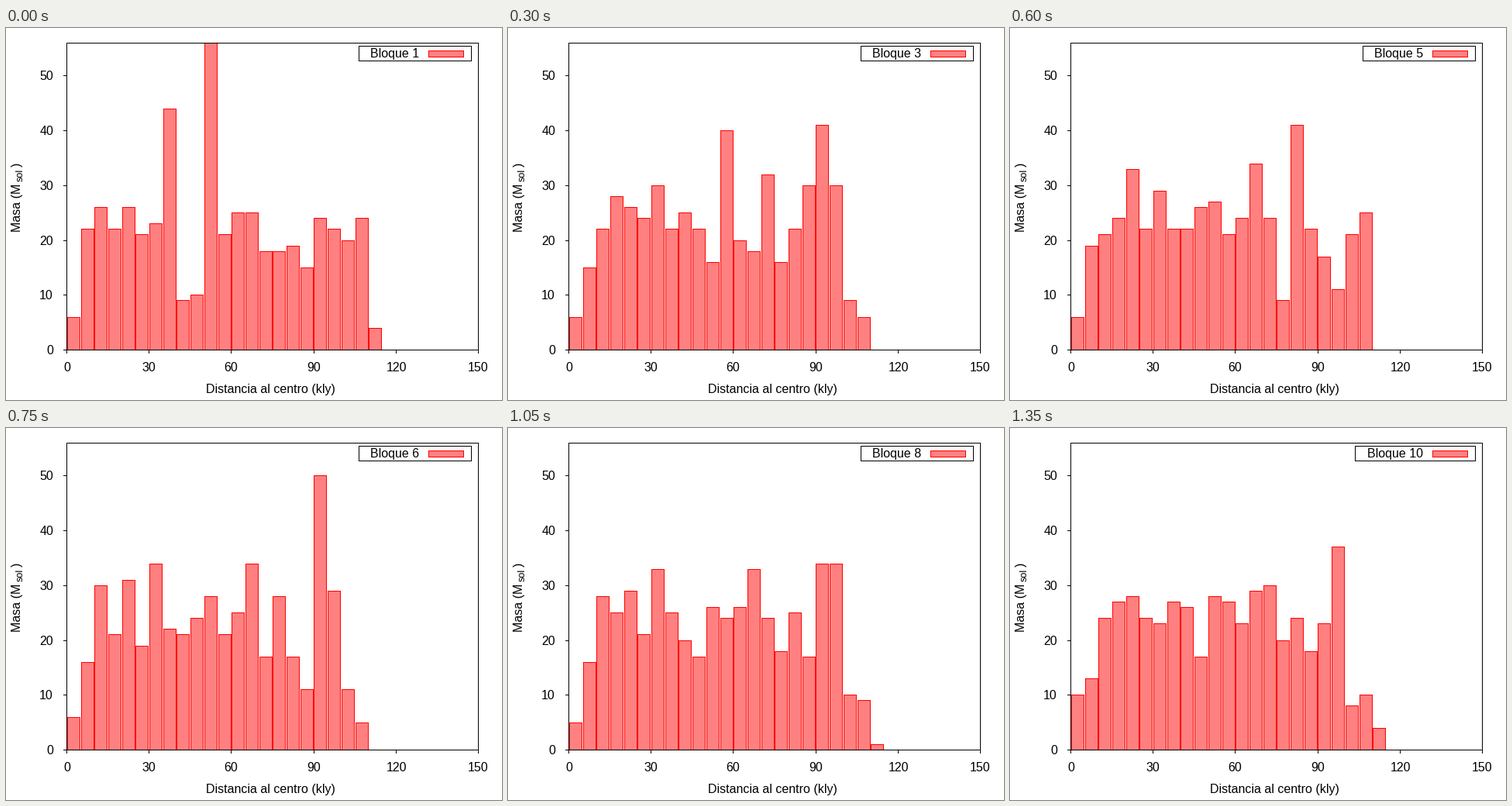
Animation, 640 px wide and 480 px high, one loop 1.5 s. Source, as a matplotlib script:

```python
import numpy as np
import matplotlib.pyplot as plt
from matplotlib.animation import FuncAnimation
from matplotlib.patches import Rectangle

W, H, DPI = 640, 480, 80
LEFT, RIGHT, TOP, BOTTOM = 78, 609, 19, 415
X_MAX, Y_MAX, BIN = 150, 56, 5
TOTAL = 500          # every block holds the same mass
BINS = 23
RED, PINK = "#ff0000", "#ff8080"


def block(*masses):
    """Bin masses; the last occupied bin takes what is left of the total."""
    out = np.zeros(BINS)
    out[:len(masses)] = masses
    out[len(masses)] = TOTAL - sum(masses)
    return out


def between(a, b, first):
    """A block halfway between two others, with a given innermost bin."""
    mid = np.rint((a + b) / 2)[:21]
    mid[0] = first
    return block(*mid)


b1 = block(6, 22, 26, 22, 26, 21, 23, 44, 9, 10, 56, 21, 25, 25, 18, 18,
           19, 15, 24, 22, 20, 24)
b2 = block(8, 17, 20, 31, 25, 25, 31, 20, 26, 21, 12, 48, 20, 17, 21, 18,
           31, 45, 26, 32)
b4 = block(8, 13, 25, 24, 28, 24, 30, 24, 24, 23, 21, 32, 21, 20, 44, 15,
           14, 15, 56, 27)
b5 = block(6, 19, 21, 24, 33, 22, 29, 22, 22, 26, 27, 21, 24, 34, 24, 9,
           41, 22, 17, 11, 21)
b6 = block(6, 16, 30, 21, 31, 19, 34, 22, 21, 24, 28, 21, 25, 34, 17, 28,
           17, 11, 50, 29, 11)
b8 = block(5, 16, 28, 25, 29, 21, 33, 25, 20, 17, 26, 24, 26, 33, 24, 18,
           25, 17, 34, 34, 10, 9)
b10 = block(10, 13, 24, 27, 28, 24, 23, 27, 26, 17, 28, 27, 23, 29, 30, 20,
            24, 18, 23, 37, 8, 10)
blocks = [b1, b2, between(b2, b4, 6), b4, b5, b6,
          between(b6, b8, 5), b8, between(b8, b10, 8), b10]

plt.rcParams["font.family"] = "Liberation Sans"
fig = plt.figure(figsize=(W / DPI, H / DPI), dpi=DPI, facecolor="white")
ax = fig.add_axes([0, 0, 1, 1])
ax.set_xlim(0, W)
ax.set_ylim(H, 0)
ax.axis("off")


def px(x):
    return LEFT + x * (RIGHT - LEFT) / X_MAX


def py(y):
    return int(round(BOTTOM - y * (BOTTOM - TOP) / Y_MAX))


def box(x0, y0, x1, y1, color, z=1):
    """Fill whole pixels from (x0, y0) to (x1, y1), both included."""
    return ax.add_patch(Rectangle((x0, y0), x1 - x0 + 1, y1 - y0 + 1, lw=0,
                                  fc=color, antialiased=False, zorder=z))


def outlined(x0, y0, x1, y1, edge, fill, z=1):
    return (box(x0, y0, x1, y1, edge, z),
            box(x0 + 1, y0 + 1, x1 - 1, y1 - 1, fill, z + 0.1))


def span(rect, x0, y0, x1, y1):
    rect.set_bounds(x0, y0, x1 - x0 + 1, y1 - y0 + 1)


def label(x, y, s, ha="center", size=16, rot=0):
    return ax.text(x, y, s, ha=ha, va="baseline", fontsize=size * 72 / DPI,
                   color="black", rotation=rot, rotation_mode="anchor",
                   zorder=6)


# Frame, ticks and labels
for edge in ((LEFT, TOP, RIGHT, TOP), (LEFT, BOTTOM, RIGHT, BOTTOM),
             (LEFT, TOP, LEFT, BOTTOM), (RIGHT, TOP, RIGHT, BOTTOM)):
    box(*edge, "black", 5)
for v in range(0, X_MAX + 1, 30):
    x = int(round(px(v)))
    box(x, BOTTOM, x, BOTTOM + 4, "black", 5)
    label(x + 0.5, 443, str(v))
for v in range(0, Y_MAX, 10):
    y = py(v)
    box(LEFT - 4, y, LEFT, y, "black", 5)
    label(61, y + 6, str(v), "right")
label(341, 471, "Distancia al centro (kly)")
label(19, 263, "Masa (M", "left", rot=90)
label(22, 198, "sol", "left", 12.8, 90)
label(19, 179, ")", "left", rot=90)

# Legend
key = outlined(455, 23, 600, 42, "black", "white", 3)
outlined(545, 29, 590, 37, RED, PINK, 4)
title = label(533, 38, "", "right")

# Bars
GAP = 0.39
edges = [(int(np.ceil(px(k * BIN) + GAP)), int(px((k + 1) * BIN) - GAP))
         for k in range(BINS)]
bars = [outlined(x0, TOP, x1, BOTTOM, RED, PINK) for x0, x1 in edges]


def draw(i):
    n = i + 1
    title.set_text(f"Bloque {n}")
    x = 455 if n < 10 else 445
    span(key[0], x, 23, 600, 42)
    span(key[1], x + 1, 24, 599, 41)
    for (x0, x1), (rim, body), v in zip(edges, bars, blocks[i]):
        top = py(v)
        span(rim, x0, top, x1, BOTTOM)
        span(body, x0 + 1, top + 1, x1 - 1, BOTTOM - 1)
        rim.set_visible(v > 0)
        body.set_visible(v > 0)
    return []


anim = FuncAnimation(fig, draw, frames=len(blocks), interval=150,
                     repeat=True, repeat_delay=0, blit=False)
plt.show()
```
